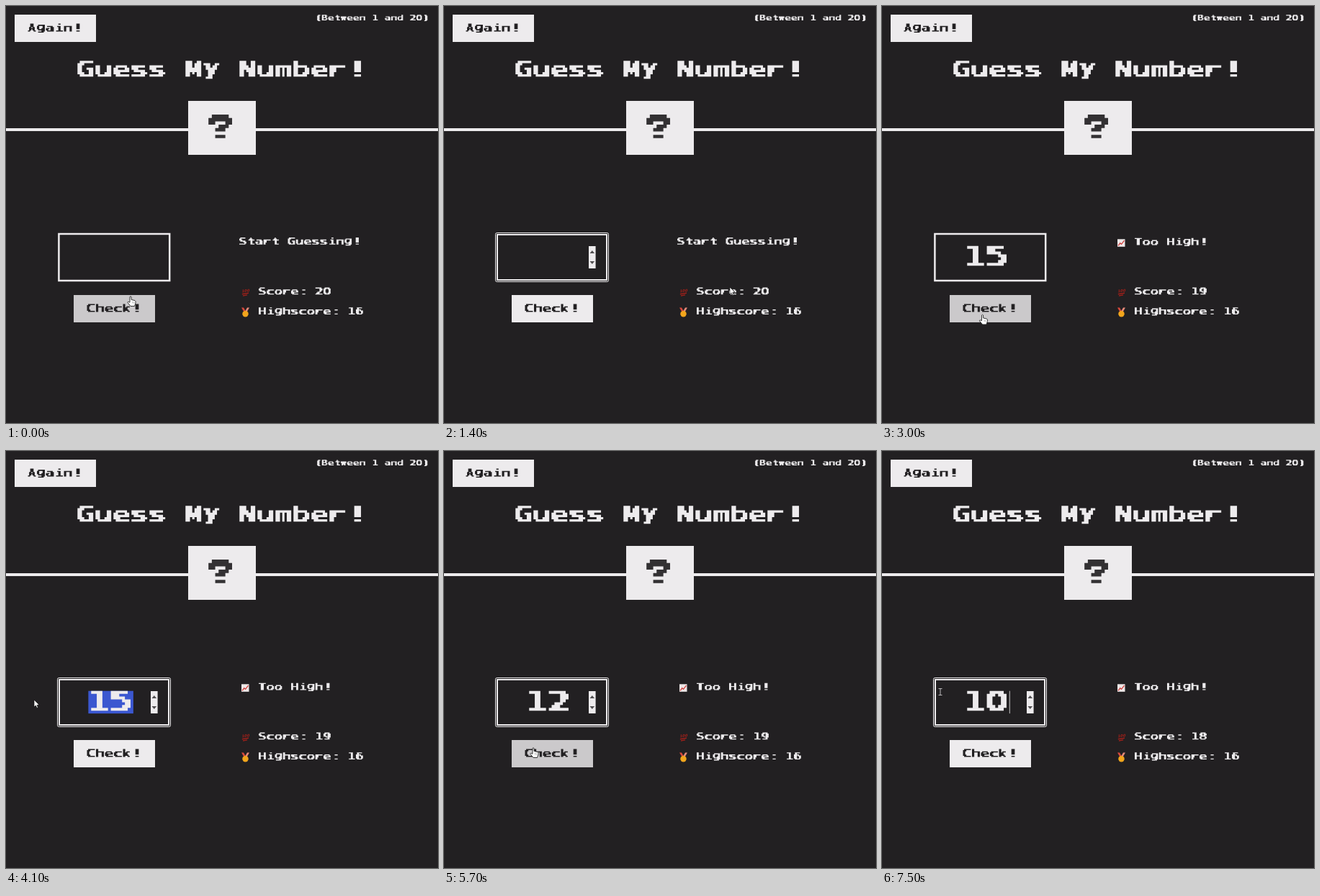
Write an HTML page with a canvas that moves like this. It is 600 px wide and 580 px high and loops after 8 s.

```html
<!DOCTYPE html>
<html lang="en">
<head>
<meta charset="utf-8">
<title>Guess My Number!</title>
<style>
  html, body { margin: 0; width: 100%; height: 100%; overflow: hidden; background: #222022; }
  canvas { display: block; }
</style>
</head>
<body>
<canvas id="stage" width="600" height="580"></canvas>
<script>
const ctx = document.getElementById('stage').getContext('2d');
const LOOP = 8000, STEP = 100;
const BG = '#222022', LIGHT = '#edebed', HOVER = '#cbc9cb', SELECT = '#3b57d0';
const MID = 145.6, BIG = 31.25;

// Pointer path: time, x, y of the hot spot.
const PATH = [
  [0, 173, 404], [200, 170, 398], [400, 156, 379], [600, 152, 373], [900, 165, 374],
  [1400, 397, 391], [2300, 397, 391], [2400, 267, 375], [2600, 160, 415], [2800, 140, 429],
  [3200, 139, 430], [3300, 139, 430], [3500, 165, 380], [3700, 182, 350], [3900, 100, 349],
  [4100, 39, 346], [5200, 39, 346], [5400, 80, 385], [5600, 120, 412], [5700, 124, 413],
  [6100, 124, 413], [6300, 160, 375], [6500, 182, 348], [6700, 115, 340], [6900, 81, 335]
];
// Each entry: time, value.
const VALUES = [[0, ''], [1900, '1'], [2000, '15'], [4600, '1'], [4800, '12'], [7300, '1'], [7500, '10']];
const SCORES = [[0, 20], [2800, 19], [5800, 18]];
const FOCUS = [[0, false], [600, true], [2800, false], [3700, true], [5800, false], [6500, true]];
const DRAGS = [[3700, 4600], [6500, 7300]];
const CARET_RESETS = [600, 1900, 2000, 4600, 4800, 7300, 7500];

const at = (list, t) => list.filter(e => e[0] <= t).pop()[1];

function pointerAt(t) {
  const i = PATH.findIndex(k => k[0] > t);
  if (i < 0) return PATH[PATH.length - 1].slice(1);
  const [t0, x0, y0] = PATH[i - 1], [t1, x1, y1] = PATH[i];
  const p = (t - t0) / (t1 - t0);
  return [x0 + (x1 - x0) * p, y0 + (y1 - y0) * p];
}

function rect(x, y, w, h, color) {
  ctx.fillStyle = color;
  ctx.fillRect(x, y, w, h);
}

function shape(points, fill, stroke, width = 1) {
  ctx.beginPath();
  points.forEach(([x, y]) => ctx.lineTo(x, y));
  if (fill) {
    ctx.closePath();
    ctx.fillStyle = fill;
    ctx.fill();
  }
  if (stroke) {
    ctx.strokeStyle = stroke;
    ctx.lineWidth = width;
    ctx.stroke();
  }
}

// Blocky type: an installed font is rasterised onto an 8-unit cell.
const UNIT = 10;
const pad = document.createElement('canvas');
pad.width = 8 * UNIT;
pad.height = 9 * UNIT;
const pen = pad.getContext('2d', { willReadFrequently: true });
const glyphs = {};

function questionMark() {
  const path = new Path2D();
  [[1, 0, 5, 1], [0, 1, 7, 1], [0, 2, 2, 1], [5, 2, 2, 1], [3, 3, 3, 1], [2, 4, 3, 1], [2, 6, 3, 1]]
    .forEach(r => path.rect(...r));
  return path;
}

// Letters and digits fill the cell; punctuation keeps its own width.
function stampGlyph(ch) {
  const slab = 'il1rt'.includes(ch);
  const wide = /\w/.test(ch);
  const family = slab ? '"DejaVu Sans Mono", monospace' : '"DejaVu Sans", sans-serif';
  pen.setTransform(1, 0, 0, 1, 0, 0);
  pen.clearRect(0, 0, pad.width, pad.height);
  pen.font = `${9.4 * UNIT}px ${family}`;
  const m = pen.measureText(ch);
  const ink = m.actualBoundingBoxLeft + m.actualBoundingBoxRight;
  const cols = slab && ch !== 'r' ? 6 : 7;
  const fit = wide ? (cols - 1) * UNIT / ink : 1;
  const left = wide ? 7 - cols : Math.ceil((6 - ink / UNIT) / 2);
  const base = ('gy'.includes(ch) ? 6 : 7) * UNIT;
  // Repeated passes to the right thicken the stems.
  for (let pass = 0; pass <= (wide ? 1 : 2); pass++) {
    pen.setTransform(fit, 0, 0, 1, (left + pass) * UNIT + m.actualBoundingBoxLeft * fit, base);
    pen.fillText(ch, 0, 0);
  }
}

function makeGlyph(ch) {
  if (ch === '?') return questionMark();
  stampGlyph(ch);
  const data = pen.getImageData(0, 0, pad.width, pad.height).data;
  const filled = (col, row) => {
    let sum = 0;
    for (let j = 0; j < UNIT; j++) {
      for (let i = 0; i < UNIT; i++) {
        sum += data[((row * UNIT + j) * pad.width + col * UNIT + i) * 4 + 3];
      }
    }
    return sum / (255 * UNIT * UNIT) > 0.44;
  };
  const path = new Path2D();
  for (let row = 0; row < 9; row++) {
    for (let col = 0; col < 8; col++) {
      const start = col;
      while (col < 8 && filled(col, row)) col++;
      if (col > start) path.rect(start, row, col - start, 1);
    }
  }
  return path;
}

function text(str, x, y, size, color) {
  ctx.fillStyle = color;
  [...str].forEach((ch, i) => {
    if (ch === ' ') return;
    glyphs[ch] = glyphs[ch] || makeGlyph(ch);
    ctx.save();
    ctx.translate(x + i * size, y);
    ctx.scale(size / 8, size / 8);
    ctx.fill(glyphs[ch]);
    ctx.restore();
  });
}

function button(label, x, y, color) {
  rect(x, y, 113, 38, color);
  text(label, x + 18.5, y + 12.5, 12.5, BG);
}

function hundred(x, y) {
  const red = '#a3201a';
  ctx.save();
  ctx.translate(x, y);
  ctx.transform(1, -0.12, -0.15, 1, 1, 1.5);
  ctx.fillStyle = red;
  ctx.font = 'bold 5.2px "DejaVu Sans", sans-serif';
  ctx.fillText('100', 0, 5);
  shape([[1, 7.4], [10, 7]], null, red, 1.4);
  shape([[2.5, 9.8], [8.5, 9.4]], null, red, 1.3);
  ctx.restore();
}

function medal(x, y) {
  shape([[x, y], [x + 3, y], [x + 6.5, y + 6], [x + 4, y + 7]], '#d8483c');
  shape([[x + 11, y], [x + 8, y], [x + 4.5, y + 6], [x + 7, y + 7]], '#e58a7a');
  ctx.fillStyle = '#f2a51c';
  ctx.beginPath();
  ctx.arc(x + 5.5, y + 8.7, 4.2, 0, Math.PI * 2);
  ctx.fill();
}

function chart(x, y) {
  rect(x, y, 10.5, 10.5, '#eee8e8');
  shape([[x + 1, y + 9], [x + 3.8, y + 5.5], [x + 5.5, y + 7], [x + 9.5, y + 1.8]], null, '#cf3f3c', 1.3);
}

function spinner() {
  rect(201, 334, 9.6, 31, LIGHT);
  shape([[202.5, 344], [205.8, 340], [209.1, 344]], '#504e50');
  shape([[202.5, 355], [205.8, 359], [209.1, 355]], '#504e50');
}

function ring(x, y, w, h, r, color, width) {
  ctx.strokeStyle = color;
  ctx.lineWidth = width;
  ctx.beginPath();
  ctx.roundRect(x, y, w, h, r);
  ctx.stroke();
}

function field(t, x, hover) {
  const focus = at(FOCUS, t), value = at(VALUES, t);
  if (focus) {
    ring(71.5, 315.5, 157, 68, 2, LIGHT, 1);
    ring(74, 318, 152, 63, 0, LIGHT, 2);
  } else {
    ring(73.4, 317.1, 153.8, 65, 0, LIGHT, 2.5);
  }
  if (focus || hover) spinner();

  const right = MID + value.length * BIG / 2;
  const dragging = DRAGS.some(([a, b]) => t >= a && t < b);
  const count = dragging ? Math.max(0, Math.min(2, Math.round((right - x) / BIG))) : 0;
  if (count) rect(right - count * BIG, 333.7, count * BIG, 31.4, SELECT);
  text(value, right - value.length * BIG, 333.8, BIG, LIGHT);

  const reset = CARET_RESETS.concat(DRAGS.map(d => d[0])).filter(r => r <= t);
  const since = t - Math.max(...reset);
  if (focus && !count && since % 1000 < 500) rect(right, 333.7, 0.8, 31.4, LIGHT);
}

function arrow(x, y) {
  shape([[0, 0], [0, 10], [2.3, 8], [3.9, 11.4], [5.5, 10.6], [4, 7.4], [7, 7]]
    .map(([a, b]) => [x + a, y + b]), '#fff', '#111', 0.7);
}

function beam(x, y) {
  const c = '#b9b7b9';
  rect(x - 0.5, y - 4.5, 1, 9, c);
  rect(x - 2.5, y - 5, 5, 1, c);
  rect(x - 2.5, y + 4, 5, 1, c);
}

function hand(x, y) {
  ctx.save();
  ctx.translate(x, y);
  ctx.beginPath();
  ctx.moveTo(-1, 0.5);
  ctx.quadraticCurveTo(0, -1, 1, 0.5);
  ctx.lineTo(1.2, 4.5);
  ctx.lineTo(6, 5.6);
  ctx.quadraticCurveTo(7.4, 6, 7, 9);
  ctx.lineTo(5.5, 13.5);
  ctx.lineTo(0, 13.5);
  ctx.lineTo(-4, 8.5);
  ctx.quadraticCurveTo(-4, 6.3, -1, 8.3);
  ctx.closePath();
  ctx.fillStyle = '#fff';
  ctx.strokeStyle = '#222';
  ctx.lineWidth = 0.9;
  ctx.fill();
  ctx.stroke();
  shape([[2.7, 7], [2.7, 9.5]], null, '#777', 0.6);
  shape([[4.7, 7.4], [4.7, 9.7]], null, '#777', 0.6);
  ctx.restore();
}

function draw(t) {
  const [x, y] = pointerAt(t);
  const inside = (l, tp, r, b) => x >= l && x <= r && y >= tp && y <= b;
  const onCheck = inside(94, 402, 207, 440);
  const onField = inside(72, 316, 228.5, 383);
  const onSpinner = inside(201, 334, 211, 365);
  const score = at(SCORES, t);

  rect(0, 0, 600, 580, BG);
  rect(0, 170, 600, 4, LIGHT);
  button('Again!', 12, 12, LIGHT);
  text('(Between 1 and 20)', 430, 12.3, 8.75, LIGHT);
  text('Guess My Number!', 99.3, 76.3, 25, LIGHT);
  rect(253, 132, 94, 75, LIGHT);
  text('?', 281.2, 151, 37.5, '#333133');

  field(t, x, onField);
  button('Check!', 94, 402, onCheck ? HOVER : LIGHT);

  if (score === 20) {
    text('Start Guessing!', 324, 322, 11.25, LIGHT);
  } else {
    chart(327, 324.3);
    text('Too High!', 351, 322.7, 11.25, LIGHT);
  }
  hundred(327, 392);
  text('Score: ' + score, 351, 391.5, 11.25, LIGHT);
  medal(327, 419.5);
  text('Highscore: 16', 351, 419.2, 11.25, LIGHT);

  const cursor = onCheck ? hand : onField && !onSpinner ? beam : arrow;
  cursor(x, y);
}

function frame(now) {
  draw(Math.floor((now % LOOP) / STEP) * STEP);
  requestAnimationFrame(frame);
}
draw(0);
requestAnimationFrame(frame);
</script>
</body>
</html>
```
